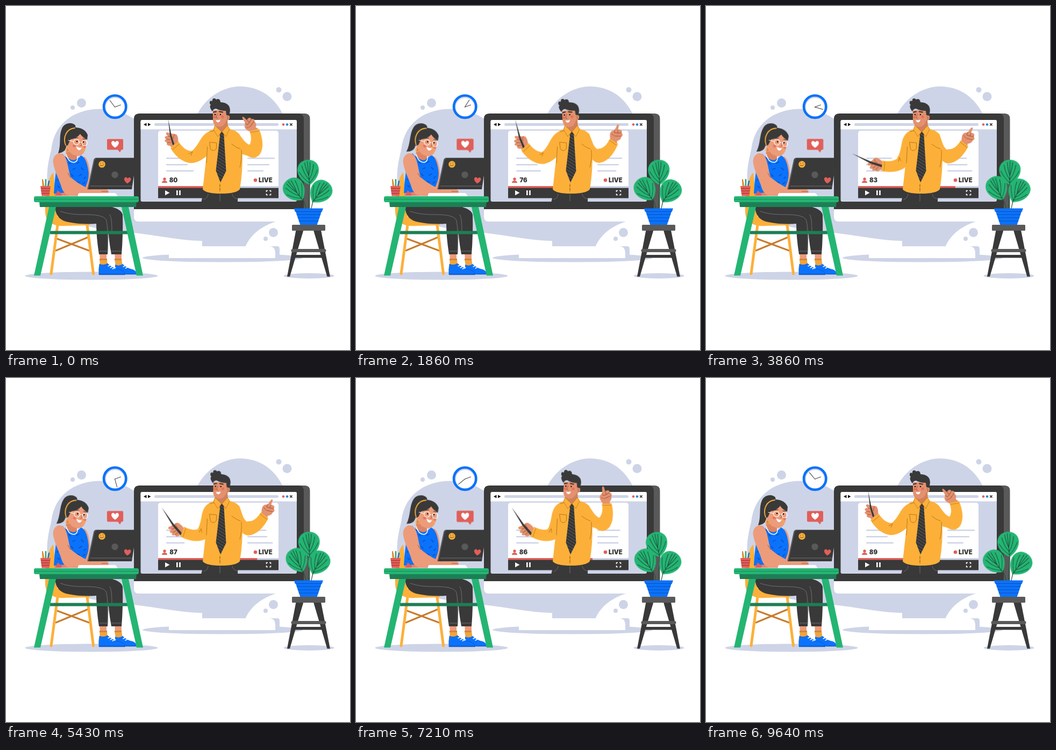
Recreate the animation shown at these times as an HTML page. Size 640x640 px, loop 9710 ms.

```html
<!DOCTYPE html>
<html lang="en">
<head>
<meta charset="utf-8">
<title>Live lesson</title>
<style>
html, body { margin: 0; width: 100%; height: 100%; overflow: hidden; background: #fff; }
svg { display: block; width: 100vw; height: 100vh; }
text { font-family: Inter, Roboto, sans-serif; font-weight: 900; font-size: 11.3px; fill: #333; }

.mist { fill: #ced4e7; } .dark { fill: #393939; } .grey { fill: #595959; }
.blue { fill: #0b72fb; } .red { fill: #e05f59; } .white { fill: #fff; }
.green { fill: #24b573; } .pine { fill: #1d7f55; } .gold { fill: #fcb03a; }
.skin { fill: #ec9c7a; } .tan { fill: #e3916e; }
.line { fill: none; stroke-linecap: round; stroke-linejoin: round; }
.fold { stroke: #b97718; stroke-width: 1; }
.crease { stroke: #8f4a32; stroke-width: .8; }
.ink { stroke: #333; stroke-width: 1; }
.vein { stroke: #1c4032; stroke-width: 1; }

.anim, .arm, .fore, .hand, .stick { animation: 9710ms ease-in-out infinite; }
.wide { animation-name: wide; }
.sway { animation-name: sway; }
@keyframes wide { 50% { width: var(--w); } }
@keyframes sway { 50% { transform: rotate(var(--a)); } }

#minute { transform-origin: 202.5px 188px; animation-name: minute; animation-timing-function: linear; }
@keyframes minute { from { transform: rotate(-37deg); } to { transform: rotate(323deg); } }

#bubble { transform-origin: 203px 259px; animation-name: pulse; animation-duration: 4855ms; }
@keyframes pulse { 50% { transform: scale(1.05); } }

#note { animation-name: note; }
@keyframes note { 0%, 40%, 100% { width: 48px; } 11%, 26% { width: 39px; } }

#topLeaf { transform-origin: 565px 333px; animation-name: topLeaf; }
@keyframes topLeaf { 0%, 100% { transform: none; } 45% { transform: rotate(7deg); } 75% { transform: rotate(-6deg); } }

#manHead { transform-origin: 402px 224px; animation-name: manHead; }
@keyframes manHead { 0%, 45%, 100% { transform: none; } 16% { transform: rotate(-3.5deg); } 69% { transform: rotate(3.9deg); } }

#girlHead { transform-origin: 122px 272px; animation-name: girlHead; }
@keyframes girlHead { 0%, 100% { transform: none; } 14%, 68% { transform: rotate(3.5deg); } }
#tail { transform-origin: 114px 228px; animation-name: tail; }
@keyframes tail { 0%, 100% { transform: none; } 14%, 68% { transform: rotate(4deg); } }
#top { animation-name: breathe; }
@keyframes breathe { 0%, 14%, 38%, 100% { transform: none; } 26.5% { transform: translateY(-3px); } }

/* pointing arm */
#armL { transform-origin: 382px 246px; animation-name: armL; }
#foreL { transform-origin: 345px 281px; animation-name: foreL; }
#handL { transform-origin: 315px 259px; animation-name: handL; }
#stick { transform-origin: 308px 249px; animation-name: stick; }
@keyframes armL {
  0%, 92%, 100% { transform: none; } 13% { transform: none; animation-timing-function: ease-in; }
  26.5% { transform: rotate(-10deg); animation-timing-function: ease-out; }
  39%, 75% { transform: rotate(-21deg); }
}
@keyframes foreL {
  0%, 92%, 100% { transform: none; } 13% { transform: none; animation-timing-function: ease-in; }
  26.5% { transform: translate(2px, 0) rotate(-3deg); animation-timing-function: ease-out; }
  39%, 41% { transform: translate(6px, 0) rotate(-26deg); }
  54%, 75% { transform: translate(7px, 0) rotate(-9.5deg); }
}
@keyframes handL {
  0%, 92%, 100% { transform: none; } 13% { transform: none; animation-timing-function: ease-in; }
  26.5% { transform: rotate(-24deg); animation-timing-function: ease-out; }
  39%, 41% { transform: rotate(-3deg); } 54%, 75% { transform: rotate(-10deg); }
}
@keyframes stick {
  0%, 13%, 92%, 100% { transform: scale(.78); } 26.5% { transform: rotate(11deg); }
  39%, 41% { transform: rotate(-5.5deg); } 54%, 75% { transform: rotate(16deg); }
}

/* gesturing arm */
#armR { transform-origin: 424px 246px; animation-name: armR; }
#foreR { transform-origin: 452px 279px; animation-name: foreR; }
#handR { transform-origin: 481px 256px; animation-name: handR; }
@keyframes armR { 0%, 82%, 100% { transform: rotate(-19deg); } 25%, 56% { transform: none; } }
@keyframes foreR { 0%, 82%, 100% { transform: rotate(-31deg); } 25%, 56% { transform: none; } }
@keyframes handR {
  0%, 86%, 100% { transform: rotate(-18deg); } 26% { transform: rotate(-4deg); }
  38%, 56% { transform: none; } 74% { transform: rotate(2deg); }
}
</style>
</head>
<body>
<svg viewBox="0 0 640 640">
<defs>
  <g id="leaf">
    <path class="green" d="M0 0C-13-7-20-17-20-29C-19-41-10-47 0-47C11-47 20-40 20-29C20-17 12-7 0 0Z"/>
    <path class="line vein" d="M0 0V-44M0-4Q-10-12-17-26M0-4Q10-12 17-26M0-10Q-8-20-11-37M0-10Q8-20 11-37M0-18Q-4-28-5-42M0-18Q4-28 5-42"/>
  </g>
  <path id="heart" d="M0 5C-9-1-6-6-3-6Q-1-6 0-3.500Q1-6 3-6C6-6 9-1 0 5Z"/>
  <pattern id="stripe" width="5" height="5" patternUnits="userSpaceOnUse" patternTransform="rotate(32)">
    <rect width="5" height="5" fill="#353535"/><rect width="5" height="1" fill="#5c5c5c"/>
  </pattern>
</defs>

<!-- backdrop -->
<g class="mist">
  <path d="M84 268C90 215 130 192 175 191.500C213 191.500 230 205 245 214H350C366 172 402 149.500 437 149.500C476 151 502 172 518 207L520 401H502C478 409 458 422 446 446L365 437C318 436 278 425 217 420C160 412 100 410 80 350C74 320 76 300 84 268Z"/>
  <circle cx="140.500" cy="180.500" r="8.500"/><circle cx="124" cy="189" r="4"/>
  <circle cx="507.500" cy="156" r="5"/><circle cx="523" cy="168.500" r="8.500"/>
  <circle cx="497.500" cy="421.500" r="8.500"/><circle cx="483" cy="433" r="4"/>
  <ellipse cx="159" cy="502" rx="123.500" ry="7.500"/>
  <ellipse cx="403" cy="468.500" rx="149" ry="8"/>
  <ellipse cx="563.500" cy="502" rx="47" ry="5"/>
</g>

<!-- clock -->
<circle class="mist" cx="202.500" cy="187.200" r="20"/>
<circle class="white" cx="203" cy="188.500" r="17.500"/>
<circle fill="none" stroke="#0b72fb" stroke-width="4.600" cx="202.700" cy="187.200" r="20.700"/>
<path class="line ink" d="M202.500 188L213.500 184"/>
<path id="minute" class="anim line ink" d="M202.500 188V172.500"/>

<!-- monitor -->
<path class="white" d="M303 447H490Q501 447 501 458V469H303Z"/>
<path class="mist" d="M365 401H446V447H365ZM479 447H505Q509 447 509 452V466H501V458Q500 447 490 447Z"/>
<path class="white" d="M238 377H554V392Q554 401 545 401H247Q238 401 238 392Z"/>
<path class="grey" d="M530 200H556Q565.500 200 565.500 210V378H530Z"/>
<path class="dark" d="M238 378V210Q238 200 248 200H544Q554 200 554 210V378Z"/>
<rect class="mist" x="250.500" y="212" width="290.500" height="152" rx="3"/>
<path class="white" d="M250.500 229.500V215Q250.500 212 253.500 212H538Q541 212 541 215V229.500Z"/>
<path fill="#111" d="M256 220.500L261.500 217.500V223.500ZM269.500 220.500L264 217.500V223.500Z"/>
<rect class="mist" x="276" y="218" width="231" height="5" rx="2.500"/>
<circle class="red" cx="516" cy="220.500" r="2.300"/><circle fill="#3087db" cx="523" cy="220.500" r="2.300"/>
<path class="line" stroke="#222" stroke-width="1.300" d="M528.600 218.700L532.200 222.300M532.200 218.700L528.600 222.300"/>
<path class="white" d="M283 335V237Q283 232 288 232H502Q507 232 507 237V335Z"/>
<g class="mist">
  <rect id="note" class="anim" x="298" y="282" width="48" height="2.500" rx="1.200"/>
  <rect x="298" y="294" width="40" height="2.500" rx="1.200"/>
  <rect class="anim wide" style="width:51px;--w:34px" x="298" y="305.500" height="2.500" rx="1.200"/>
  <rect class="anim wide" style="width:51px;--w:35px" x="449" y="282" height="2.500" rx="1.200"/>
  <rect class="anim wide" style="width:41px;--w:37px" x="449" y="294" height="2.500" rx="1.200"/>
  <rect class="anim wide" style="width:30px;--w:48px" x="449" y="305.500" height="2.500" rx="1.200"/>
</g>
<g class="red">
  <circle cx="295" cy="322" r="2.700"/><path d="M290 329Q290 325 295 325T300 329Z"/>
  <circle cx="464" cy="324" r="3.300"/>
</g>
<text id="count" x="311.500" y="328.300" text-anchor="middle">80</text>
<text x="470" y="328.200">LIVE</text>
<rect class="mist" x="283" y="335" width="224" height="4"/>
<rect class="red anim wide" style="width:125px;--w:186px" x="283" y="335" height="4"/>
<rect class="dark" x="283" y="338.500" width="224" height="19"/>
<path class="white" d="M296 343L304.500 347.500L296 352.300ZM317 343H319.600V352H317ZM322.200 343H324.800V352H322.200Z"/>
<path fill="none" stroke="#fff" stroke-width="1.500" d="M484.500 346V343.500H487M490 343.500H492.500V346M492.500 349V351.500H490M487 351.500H484.500V349"/>

<!-- teacher -->
<path class="dark" d="M369 338H432L431 364H363.500Z"/>
<path class="line" stroke="#777" stroke-width=".8" d="M376 350Q376 357 368 360M421 350Q422 357 430 359M398 350V363"/>
<g id="armL" class="arm gold">
  <path d="M390 232C374 231 367 240 361 250C355 260 350 267 344 271L347 292C358 291 368 284 376 277L390 270Z"/>
  <g id="foreL" class="fore">
    <g id="handL" class="hand">
      <path class="tan" d="M309 264L320 255C321 249 320 242 317 239C313 237 305 238 301 235C296 235 297 240 302 242C295 241 293 246 299 248C294 248 294 253 300 254C297 257 301 260 305 260Z"/>
      <path class="line crease" d="M302 242L308 244M299 248L306 249M300 254L307 254M314 239Q310 243 312 247"/>
      <path id="stick" class="stick dark" d="M310.500 261L304 238L299.800 199L307.500 237L314.500 258.500Q313.500 262 310.500 261Z"/>
    </g>
    <circle cx="345" cy="281" r="11.200"/>
    <path d="M347 270C336 270 328 263 321 252L306 264C313 277 328 292 345 292Z"/>
    <path class="line fold" d="M322 257L310 267M340 275L346 272M344 278L347 271"/>
  </g>
</g>
<g id="armR" class="arm gold">
  <path d="M415 234C428 230 434 238 437 246C440 256 443 264 448 267L452 293C446 293 441 290 436 284L415 270Z"/>
  <g id="foreR" class="fore">
    <g id="handR" class="hand">
      <path class="tan" d="M475 252C476 246 475 239 481 236L487 235L493 227C495 225 497 226 496 229L493 236C499 236 501 240 498 243C501 246 499 250 496 250C495 254 491 256 487 256L486 262Z"/>
      <path class="line crease" d="M487 235L485 240L491 242L493 236M491 242L498 243M488 247L496 249M480 241Q483 247 488 247"/>
    </g>
    <circle cx="452" cy="279.500" r="13"/>
    <path d="M452 266.500C460 267 468 260 474 250L488 261C483 272 470 290 455 292Z"/>
    <path class="line fold" d="M473 253L485 263"/>
  </g>
</g>
<path class="gold" d="M389 229Q372 232 372 244Q376 258 373 278L366 341Q372 349 400 349Q428 349 435 341Q441 305 439.500 272C437 258 438 246 434 238Q426 230 412 228Z"/>
<path class="line fold" d="M374.500 262L373 292M438 268Q439 286 435 300M420 257Q429 264 436 266M379 253.500L391.500 254.500V264Q390 269 385 269Q380 268 380 264ZM380 234L390 231M398 331V345"/>
<circle cx="398" cy="334" r="1" fill="#a5640f"/><circle cx="398" cy="341" r="1" fill="#a5640f"/>
<path fill="#d27f5b" d="M390 212L412 211L413 228L401 236L389 227Z"/>
<path fill="url(#stripe)" d="M397 234L405 234L405.500 241L409.500 307L399 328.500L390.500 306L398 242Z"/>
<path class="gold" stroke="#b97718" stroke-width=".8" stroke-linejoin="round" d="M389 222L401 234L394 243L386 230ZM412 222L416 229L409 243L402 234Z"/>
<g id="manHead" class="anim">
  <path class="tan" d="M385 194H411L412 203Q417 203 416 209Q414 214 410 213Q406 225 396 225Q386 224 385 213Z"/>
  <path class="dark" d="M384 196C380 191 378 186 381 184C377 181 379 174 384 177C383 172 388 170 391 174C396 171 399 175 399 179C407 179 415 183 416 189C418 195 416 201 414 204L410 203L409 195Q398 195 391 191Q386 191 384 196Z"/>
  <path class="line" stroke="#333" stroke-width="2.200" d="M386 197.500L391 196.500M397 196.500L403 197.500"/>
  <circle cx="389" cy="202" r="1.200"/><circle cx="399" cy="202" r="1.200"/>
  <g fill="#e5705b"><circle cx="388" cy="207" r="2.400"/><circle cx="403" cy="206" r="2.600"/></g>
  <path class="line crease" d="M393 201L391 208L394 209M411 206Q415 206 412 211"/>
  <path class="white" d="M390 212Q395 213.500 399 211Q398 216.500 394 216.500Q391 215.500 390 212Z"/>
</g>

<!-- chair -->
<path class="gold" d="M88 310C78 318 72 350 73 384Q74 402 88 406Q96 410 110 409L155 408Q158 401 150 394L96 392Z"/>
<path class="line" stroke="#c87b2b" stroke-width="3" d="M93 455L153 430M95 433L157 456"/>
<path class="line" stroke="#fcb03a" stroke-width="5" d="M96 407L84 498M151 407L162.500 498"/>

<!-- student -->
<g>
  <path class="skin" d="M174 458H187V474H175ZM202 458H215V474H203Z"/>
  <path fill="#f0a43c" d="M174 471H188L189 484H175ZM202 471H215L217 484H204Z"/>
  <path fill="#d2863a" d="M174 470H188V473H174ZM202 470H215V473H202Z"/>
  <path class="blue" d="M203 481Q210 485 217 480Q225 488 236 490Q243 493 243 499H203Z"/>
  <path class="blue" stroke="#0a4db5" stroke-width=".6" d="M174 480Q181 484 189 479Q197 488 210 490Q221 493 222 500H173Q172 490 174 480Z"/>
  <path class="line" stroke="#fff" stroke-width="1.400" d="M190 484L196 481M194 487L200 484M198 489L204 487M218 485L224 482M222 488L228 485"/>
  <path stroke="#0a4db5" d="M173 499H222M223 499H243"/>
  <path class="dark" d="M91 372H190Q214 377 217 388Q218 425 215 462H196Q190 430 190 405Q191 430 189 462H173Q168 430 168 405Q140 407 116 402Q92 398 91 372Z"/>
  <path class="line" stroke="#777" stroke-width=".9" d="M101 382Q120 389 150 388Q180 388 186 397Q190 405 189 458M193 388Q197 392 197 420M174 456H189M196 456H214"/>
  <path class="skin" d="M145 280C152 283 156 298 156 316L151 342H140Z"/>
  <path fill="#e8826a" d="M90 342H146V353H90Z"/>
  <g id="top" class="anim">
    <path class="blue" d="M105 275C112 285 132 290 139 278C147 280 151 292 153 305Q156 319 148 337L122 346L89 349Q90 330 92 316L96 285Z"/>
    <path class="line" stroke="#0a49ad" stroke-width="1.200" d="M116 291L120 294M131 293L136 290M124 304L129 302M140 301L144 305M121 313L125 317M136 316L141 313M145 321L148 318M132 327L137 329M95 324L99 322M96 335L100 338M143 331L147 328M112 282L115 286"/>
  </g>
  <path class="red" d="M92 353L96 343L104 350L103 353Z"/>
  <path class="skin" d="M99 274C91 275 86 284 88 293C90 306 97 319 102 333Q106 350 118 353L189 349C194 345 190 340 180 340L150 338C140 333 128 326 120 318C116 305 115 290 110 281Q106 274 99 274Z"/>
  <path class="line crease" d="M120 319L115 311M152 338L157 341M178 345L189 345"/>
  <path fill="#dd8563" d="M113 262L131 270L133 282Q126 293 111 279Z"/>
  <path class="line" stroke="#fff" stroke-width="1.500" d="M112 276Q116 291 127 291Q134 289 133 280"/>
  <g id="girlHead" class="anim">
    <path id="tail" class="anim dark" d="M104 228C108 217 123 215 129 222L131 236C119 241 113 250 112 260Q112 272 97 274C103 258 98 241 104 228Z"/>
    <path class="skin" d="M113 254C112 236 135 230 147 241Q150 250 149 261Q146 279 133 279Q119 277 116 266Q111 265 113 254Z"/>
    <path class="dark" d="M110 261C104 246 111 226 130 226Q147 227 152 240L151 249Q142 244 138 238Q131 247 120 248L115 259Z"/>
    <path class="line" stroke="#fcb03a" stroke-width="1.800" d="M111 259C105 244 113 228 128 227"/>
    <circle class="line" stroke="#fcb03a" stroke-width="1.200" cx="114" cy="268" r="3.500"/>
    <path class="line" stroke="#fcb03a" stroke-width="1.200" d="M143 262Q148 268 141 272"/>
    <g fill="#e8705f"><circle cx="127" cy="260" r="2.800"/><circle cx="146" cy="262" r="2.300"/></g>
    <circle cx="132" cy="252" r="1.300"/><circle cx="144" cy="253" r="1.300"/>
    <path class="line ink" d="M128 246L134 245M143 247L148 248"/>
    <g class="line" stroke="#fff" stroke-width="1.100">
      <circle cx="131" cy="253" r="5.300"/><circle cx="146" cy="255" r="5"/><path d="M136 253L141 254M126 252L116 250"/>
    </g>
    <path class="line crease" d="M139 254L141 259L138 260"/>
    <path class="white" d="M131 261Q136 265 141 263Q139 269 135 268Q131 266 131 261Z"/>
  </g>
</g>

<!-- laptop -->
<path class="white" d="M136 348H203Q207 350 207 354H134Q133 350 136 348Z"/>
<path class="dark" d="M167 282.500H243L234 341H151.500L163 287Q164 283 167 282.500Z"/>
<path class="line" stroke="#707070" stroke-width="1" d="M168 283Q165 284 164 288L153 340M157 335H234"/>
<circle class="gold" cx="178.500" cy="294.500" r="6.300"/>
<path class="line" stroke="#6f4b0c" stroke-width="1" d="M176 292V293M180.500 291.500V292.500M175 296Q179 299 182 295"/>
<circle class="grey" cx="202.500" cy="314" r="6.200"/>
<use href="#heart" class="red" transform="translate(226 325) rotate(5) scale(1.05)"/>

<!-- desk -->
<g>
  <path class="pine" d="M82 418.500H226V424.500H82ZM62 364H243L242 374H63Z"/>
  <path class="green" d="M80 374H93L64 501.500H52ZM215 374H228L255 501.500H243Z"/>
  <rect class="green" x="52" y="354" width="195" height="11" rx="3"/>
  <path class="line" stroke="#168b55" stroke-width="1" d="M53 359.500H246"/>
  <path class="line" stroke="#fcb03a" stroke-width="2" d="M68.500 325L72 338"/>
  <path class="line" stroke="#d07b36" stroke-width="2" d="M68 323L69 338"/>
  <path class="line" stroke="#24a06b" stroke-width="2.400" d="M74 323V338"/>
  <path class="line" stroke="#0b72fb" stroke-width="2.400" d="M80 326L77.500 338"/>
  <path class="red" d="M64 335H83L80.500 353.500H66.500Z"/>
  <path stroke="#9f2f2e" stroke-width="1.200" d="M65 339.500H82M65.500 344H81.500M66 348.500H81"/>
</g>

<!-- chat bubble -->
<g id="bubble" class="anim">
  <path class="red" d="M190 247.500H216Q218 247.500 218 249.500V265.500Q218 267.500 216 267.500H214.500L212 272.500L208 267.500H190Q188 267.500 188 265.500V249.500Q188 247.500 190 247.500Z"/>
  <use href="#heart" class="white" transform="translate(203 258) scale(1.15)"/>
</g>

<!-- plant -->
<g>
  <path class="line" stroke="#24513d" stroke-width="1.200" d="M565 332Q564 355 563 378M552 360Q557 367 558 378M571 364Q569 370 568 378"/>
  <g class="anim sway" style="transform-origin:552px 361px;--a:14deg"><use href="#leaf" transform="translate(552 361) rotate(-38)"/></g>
  <g class="anim sway" style="transform-origin:570px 365px;--a:-10deg"><use href="#leaf" transform="translate(570 365) rotate(38)"/></g>
  <g id="topLeaf" class="anim"><use href="#leaf" transform="translate(565 333) rotate(-6)"/></g>
  <path class="blue" d="M536 376.500H590L588 382.500H587L578.500 407.500H547.500L539 382.500H537.500Z"/>
  <path class="line" stroke="#0950b5" stroke-width="1" d="M539 382.500H587M541 388H585M543 394H583M545 400H581"/>
  <path class="dark" d="M539.500 417H553.500L528 503.500H523ZM572 417H586L603 503.500H597.500Z"/>
  <path class="dark" d="M537 463H589V468.500H536Z"/>
  <rect class="grey" x="530.500" y="452" width="65" height="6" rx="3"/>
  <rect class="grey" x="532" y="407" width="62" height="11" rx="1.500"/>
</g>
</svg>
<script>
const LOOP = 9710;
const viewers = [80, 76, 83, 87, 86, 86, 89];
const label = document.getElementById('count');

function tick() {
  const phase = performance.now() % LOOP / LOOP;
  label.textContent = viewers[Math.floor(phase * viewers.length)];
  requestAnimationFrame(tick);
}
tick();
</script>
</body>
</html>
```
